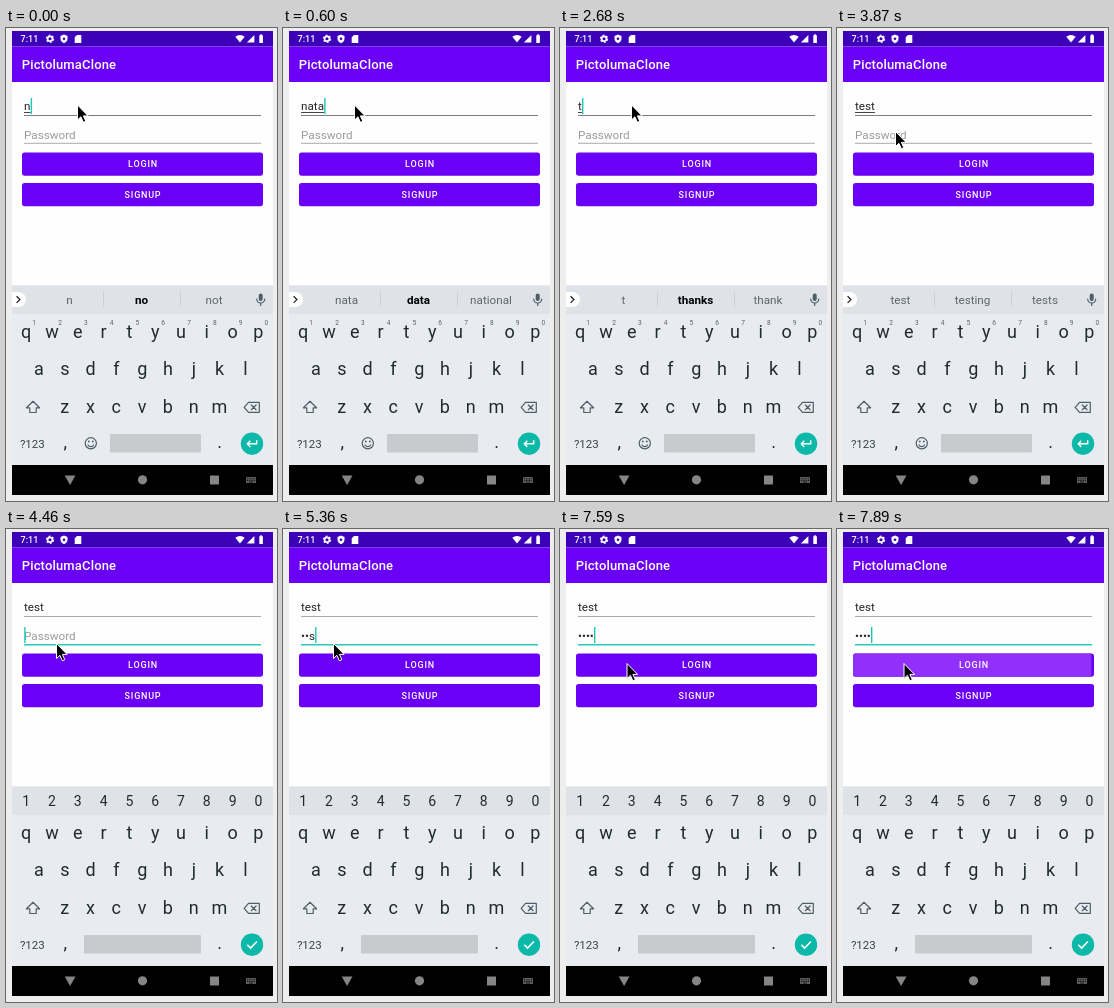
Animation of 271x473 px, one loop 8000 ms. Source, as an HTML page:

```html
<!DOCTYPE html>
<html lang="en">
<head>
<meta charset="utf-8">
<title>Login form</title>
<style>
  html, body { margin: 0; height: 100%; overflow: hidden; background: #eeeeee; }
  svg { display: block; width: 100vw; height: 100vh; font-family: Roboto, "Noto Sans", sans-serif; }
  .mid { text-anchor: middle; }
  .field { font-size: 11.7px; fill: #242424; }
  .hint { fill: #9b9b9b; }
  .btn { font-size: 9px; font-weight: 500; letter-spacing: .78px; fill: #fff; }
  .word { font-size: 11.7px; fill: #5c666c; }
  .bold { font-weight: 700; fill: #000; }
  .key { font-size: 18px; fill: #202b31; }
  .sup { font-size: 6.6px; fill: #59656b; }
  .num { font-size: 14px; fill: #202b31; }
  .icon { fill: none; stroke: #4f5f67; stroke-width: 1.2; stroke-linejoin: round; stroke-linecap: round; }
</style>
</head>
<body>
<svg viewBox="0 0 271 473">
  <rect width="271" height="473" fill="#eeeeee"/>
  <rect x="6" y="3" width="261" height="464" fill="#fefefe"/>

  <!-- status bar -->
  <rect x="6" y="3" width="261" height="15.5" fill="#3b00b8"/>
  <g fill="#fff">
    <text x="14.6" y="14.2" font-size="9" font-weight="500">7:11</text>
    <circle cx="44" cy="10.8" r="2.4" fill="none" stroke="#fff" stroke-width="1.7"/>
    <circle cx="44" cy="10.8" r="3.6" fill="none" stroke="#fff" stroke-width="1.2" stroke-dasharray="1.9 1.87"/>
    <path d="M58 6.5l3.5 1.5v2.8c0 2-1.5 3.700-3.500 4.400c-2-.7-3.500-2.400-3.500-4.400V8z"/>
    <circle cx="58" cy="10.700" r="1.300" fill="#3b00b8"/>
    <path d="M71 7h4.300v8h-6.600V9.300z"/>
    <path d="M229.300 8.700a7 7 0 0 1 9.400 0L234 14.600z"/>
    <path d="M248.400 7v7.600h-7.600z"/>
    <path d="M253.300 7.300h1v-1h1.600v1h1v7.600h-3.600z"/>
  </g>

  <!-- app bar -->
  <rect x="6" y="18.500" width="261" height="35.500" fill="#6a00f6"/>
  <text x="15.700" y="41" font-size="13" font-weight="500" letter-spacing=".16" fill="#fff">PictolumaClone</text>

  <!-- form -->
  <rect id="line1" x="18" y="87" width="237" height="1"/>
  <rect id="line2" x="18" width="237"/>
  <text id="user" class="field" x="18" y="82.300"></text>
  <rect id="under" x="18" y="84" height="1" fill="#444"/>
  <text id="pass" class="field" x="18" y="111"></text>
  <rect id="caret" width="1.400" height="16" fill="#1cc9b6"/>
  <rect x="16" y="124.500" width="241" height="23.200" rx="2.600" fill="#6a00f6"/>
  <path id="ripple" d="M18.600 124.500H254.300V147.700H18.600a2.600 2.600 0 0 1-2.600-2.600V127.100a2.600 2.600 0 0 1 2.600-2.600z" fill="#9130fa"/>
  <rect x="16" y="155" width="241" height="23.200" rx="2.600" fill="#6a00f6"/>
  <text class="btn mid" x="137" y="139.400">LOGIN</text>
  <text class="btn mid" x="137" y="169.900">SIGNUP</text>

  <!-- keyboard -->
  <rect x="6" y="257.500" width="261" height="180" fill="#e8ecf0"/>
  <rect x="6" y="257.500" width="261" height="28.500" fill="#dfe3e7"/>
  <g id="keys"></g>
  <path class="icon" d="M27 373.300l6.600 6.500h-3.400v4.700h-6.400v-4.700h-3.400z"/>
  <path class="icon" d="M242.500 374.300h10.800v10h-10.800l-4.300-5zM245.300 377l4.800 4.700M250.100 377l-4.800 4.700"/>
  <text class="mid" x="26.300" y="419.600" font-size="11.500" fill="#35434a">?123</text>
  <text class="key mid" x="59.300" y="420">,</text>
  <text class="key mid" x="213.500" y="420">.</text>
  <circle cx="246" cy="415.700" r="11.200" fill="#0cb9a9"/>

  <g id="textKeys">
    <path d="M6 264h6.500a7.500 7.500 0 0 1 0 15H6z" fill="#fff"/>
    <path d="M10.600 268.300l3.300 3.300l-3.300 3.300" fill="none" stroke="#222" stroke-width="1.300"/>
    <path d="M97.500 264v15M174.500 264v15" stroke="#cbd0d4"/>
    <text id="w0" class="word mid" x="63.500" y="276"></text>
    <text id="w1" class="word mid" x="135.500" y="276"></text>
    <text id="w2" class="word mid" x="208" y="276"></text>
    <rect x="252.700" y="265.500" width="4" height="7.500" rx="2" fill="#4f5f67"/>
    <path class="icon" d="M250.700 271a4 4 0 0 0 8 0M254.700 275.200v2.300"/>
    <g id="sups"></g>
    <circle class="icon" cx="84.800" cy="415.300" r="5.600"/>
    <path class="icon" d="M82 417a3.200 3.200 0 0 0 5.600 0"/>
    <circle cx="82.800" cy="413.500" r=".9" fill="#4f5f67"/>
    <circle cx="86.800" cy="413.500" r=".9" fill="#4f5f67"/>
    <rect x="104" y="406" width="91" height="18.500" rx="1" fill="#c7cbce"/>
    <path d="M250.700 412.200v3.600h-9.200M244.300 412.700l-3 3.100l3 3.100" fill="none" stroke="#fff" stroke-width="1.400"/>
  </g>
  <g id="passKeys">
    <g id="nums"></g>
    <rect x="78" y="406" width="117" height="18.500" rx="1" fill="#c7cbce"/>
    <path d="M241.300 415.800l3.300 3.300l6.300-6.500" fill="none" stroke="#fff" stroke-width="1.500"/>
  </g>

  <!-- navigation bar -->
  <rect x="6" y="437" width="261" height="30" fill="#000"/>
  <g fill="#858585">
    <path d="M58.700 447.500h10.800l-5.400 9.500z"/>
    <circle cx="136.500" cy="451.800" r="4.600"/>
    <rect x="204" y="447.500" width="9" height="9" rx=".6"/>
    <rect x="240" y="449" width="10" height="6" rx=".6" fill="#5c5c5c"/>
  </g>
  <path d="M241 450.800h8M241 452.500h8" stroke="#000" stroke-width=".8" stroke-dasharray="1 .75"/>
  <path d="M243 454h4" stroke="#000" stroke-width=".7"/>

  <path id="pointer" d="M0 0V15L3.400 11.800L5.900 17.300L8.300 16.200L5.900 10.900H10.600Z" fill="#000" stroke="#fff" stroke-width="1"/>
</svg>
<script>
const LOOP = 8000;
const $ = id => document.getElementById(id);

function label(parent, cls, x, y, str) {
  const el = document.createElementNS("http://www.w3.org/2000/svg", "text");
  el.setAttribute("class", cls + " mid");
  el.setAttribute("x", x);
  el.setAttribute("y", y);
  el.textContent = str;
  $(parent).append(el);
}

const PITCH = 25.8;
function row(parent, cls, x, y, chars) {
  [...chars].forEach((c, i) => label(parent, cls, x + i * PITCH, y, c));
}
row("keys", "key", 20.2, 309.6, "qwertyuiop");
row("keys", "key", 33, 346.8, "asdfghjkl");
row("keys", "key", 58.7, 384.6, "zxcvbnm");
row("sups", "sup", 28.2, 297, "1234567890");
row("nums", "num", 20.2, 277, "1234567890");

// Each step: start time and what changes then
const steps = [
  [0, { user: "n", pass: "", words: "n no not", bold: true, caret: true, focus: "user",
        compose: true, secret: false, press: false, at: [71.5, 77] }],
  [150, { user: "na", words: "na nah nap" }],
  [450, { user: "nat", words: "nat Nat not" }],
  [600, { user: "nata", words: "nata data national" }],
  [1040, { caret: false }],
  [1490, { caret: true }],
  [1790, { user: "nat", words: "nat Nat not" }],
  [1940, { user: "na", words: "na nah nap" }],
  [2090, { user: "n", words: "n no not" }],
  [2230, { user: "", words: "I The I'm", bold: false }],
  [2680, { user: "t", words: "t thanks thank", bold: true }],
  [2830, { user: "te", words: "te tell team" }],
  [3130, { user: "tes", words: "tes test tests" }],
  [3280, { user: "test", words: "test testing tests", bold: false }],
  [3720, { caret: false, at: [67, 88] }],
  [3870, { at: [58.5, 103.5] }],
  [4020, { at: [53, 111] }],
  [4170, { at: [50.5, 114.5] }],
  [4310, { focus: "pass", caret: true, compose: false }],
  [4460, { secret: true }],
  [4910, { pass: "t" }],
  [5060, { pass: "•e" }],
  [5360, { pass: "••s" }],
  [5510, { pass: "•••t" }],
  [6110, { caret: false, at: [51.5, 115.5] }],
  [6260, { at: [53.5, 118.5] }],
  [6400, { at: [56.5, 122.8] }],
  [6550, { caret: true, at: [63, 130] }],
  [6690, { at: [67, 134.5] }],
  [6990, { caret: false, pass: "••••" }],
  [7590, { caret: true }],
  [7890, { press: true }]
];

const show = (id, on) => $(id).setAttribute("visibility", on ? "visible" : "hidden");

function setField(id, value, hint) {
  const el = $(id);
  el.textContent = value || hint;
  el.classList.toggle("hint", !value);
  return value ? el.getComputedTextLength() : 0;
}

function draw(s) {
  const width = {
    user: setField("user", s.user, "Username"),
    pass: setField("pass", s.pass, "Password")
  };
  const onPass = s.focus === "pass";

  $("under").setAttribute("width", s.compose ? width.user : 0);
  $("line1").setAttribute("fill", onPass ? "#ababab" : "#7c7c7c");
  $("line2").setAttribute("fill", onPass ? "#2bcbb9" : "#ababab");
  $("line2").setAttribute("y", onPass ? 115 : 114.8);
  $("line2").setAttribute("height", onPass ? 1.5 : 1);

  $("caret").setAttribute("x", 18.2 + width[s.focus]);
  $("caret").setAttribute("y", onPass ? 98 : 70);
  show("caret", s.caret);

  s.words.split(" ").forEach((w, i) => { $("w" + i).textContent = w; });
  $("w1").classList.toggle("bold", s.bold);
  show("textKeys", !s.secret);
  show("passKeys", s.secret);
  show("ripple", s.press);
  $("pointer").setAttribute("transform", `translate(${s.at})`);
}

let last = -1;
function tick() {
  const t = performance.now() % LOOP;
  const n = steps.filter(([start]) => start <= t).length;
  if (n !== last) {
    draw(Object.assign({}, ...steps.slice(0, n).map(([, change]) => change)));
    last = n;
  }
  requestAnimationFrame(tick);
}
tick();
</script>
</body>
</html>
```
